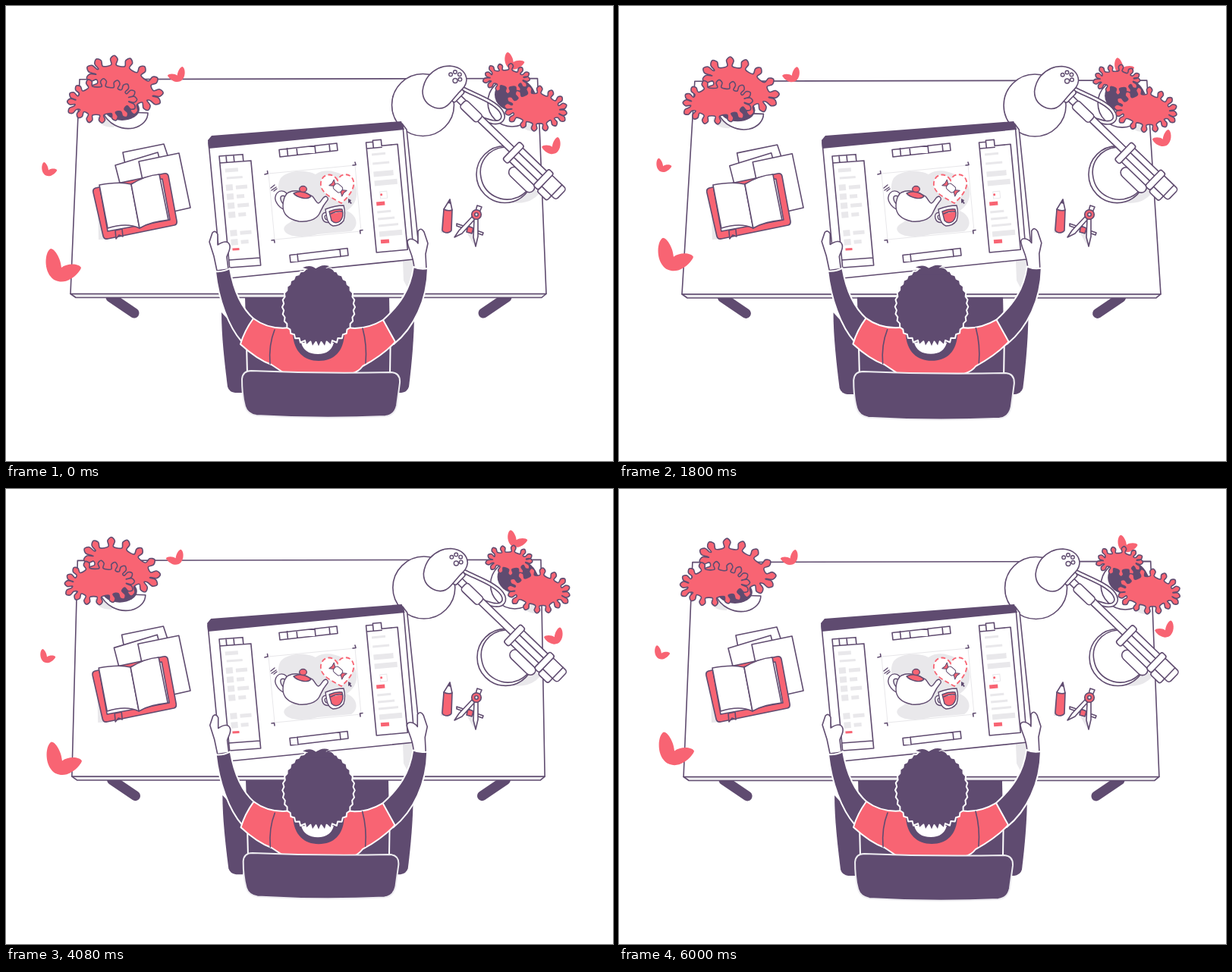
An HTML page for the animation above (6040 ms loop, 800 by 600 pixels).

```html
<!DOCTYPE html>
<html lang="en">
<head>
<meta charset="utf-8">
<title>Designer at a desk</title>
<style>
  html, body { margin: 0; width: 100%; height: 100%; overflow: hidden; background: #fff; }
  svg { display: block; width: 800px; height: 600px; }
  .l { fill: #fff; stroke: #604c70; stroke-width: 1.6; stroke-linejoin: round; stroke-linecap: round; }
  .n { fill: none; }
  .d { fill: #5f4b70; }
  .r { fill: #f86473; }
  .g { fill: #e9e8eb; }
  .w { stroke: #fff; stroke-width: 2; stroke-linejoin: round; }
  .thin { stroke-width: 1.4; }
</style>
</head>
<body>
<!-- data-m: drift x y, stretch x y, stretch centre x y -->
<svg viewBox="0 0 800 600">
  <defs>
    <path id="heart" class="r" d="M21 25C20 12 12 0 7 0C0 3 -3 25 7 37C12 44 24 46 33 40C41 36 47 27 47 25C44 19 28 19 21 25Z"/>
  </defs>

  <!-- desk -->
  <g fill="none" stroke="#5f4b70" stroke-width="13" stroke-linecap="round">
    <path data-m="-1.7 .4" d="M138 384L169 405"/>
    <path data-m="1.7 .4" d="M660 384L629 405"/>
  </g>
  <polygon id="edge" class="l" style="fill:#eeedf0"/>
  <polygon id="desk" class="l"/>

  <!-- floating hearts -->
  <g data-m="2.3 .3"><use href="#heart" transform="translate(236 80)scale(-.49 .46)"/></g>
  <g data-m="2.2 -5.5"><use href="#heart" transform="translate(47 206)scale(.43 .42)"/></g>
  <g data-m="-1.1 -15"><use href="#heart" transform="translate(52 320)"/></g>
  <g data-m="-4.4 7.6"><use href="#heart" transform="translate(657 61)scale(.56 .52)"/></g>
  <g data-m="-3.3 -10.6"><use href="#heart" transform="translate(731 173)scale(-.53 .51)"/></g>

  <!-- left plant -->
  <g data-m="3.6 1.4">
    <path class="g" d="M120 146Q122 160 142 160L150 150Z"/>
    <path class="l" d="M127 139C134 156 152 164 168 161C180 158 187 150 187 141Z"/>
    <ellipse class="d" cx="153" cy="136" rx="23" ry="15"/>
  </g>
  <g data-m="4.2 1.9"><path id="leafA" class="l r" transform="translate(155 104)rotate(25)"/></g>
  <g data-m="3.7 1.7"><path id="leafB" class="l r" transform="translate(127 125)rotate(-5)"/></g>

  <!-- right plant -->
  <g data-m="-4 1.2">
    <path class="g" d="M672 152Q688 170 699 163L692 146Z"/>
    <ellipse class="l" cx="667" cy="127" rx="32" ry="32"/>
    <ellipse class="d" cx="670" cy="117" rx="26" ry="22"/>
  </g>
  <g data-m="-3.9 1.6"><path id="leafC" class="l r" transform="translate(660 95)"/></g>
  <g data-m="-4.3 1.5"><path id="leafD" class="l r" transform="translate(699 136)rotate(4)"/></g>

  <!-- papers and book -->
  <g data-m="0 0 -.018 -.012 245 268" class="l">
    <path d="M154 193L208 182L213 197L218 220L160 225Z"/>
    <path d="M144 210L200 193L215 250L153 245Z"/>
    <path d="M175 205L228 194L243 266L190 278Z"/>
  </g>
  <g data-m=".9 0">
    <path class="g" d="M121 262L129 304Q131 308 140 307L122 308Z"/>
    <path class="l r" d="M118 240L208 221Q213 220 214 224L225 283Q226 288 222 289L134 307Q129 308 128 303L115 246Q114 241 118 240Z"/>
    <path class="l" d="M124 241L134 297L216 282L206 228Z"/>
    <path class="l" d="M123 236Q149 231 165 235L176 293Q159 285 134 293Z"/>
    <path class="l" d="M165 235C178 227 190 223 202 222L214 282C200 284 188 286 176 293Z"/>
    <path class="l r" d="M144 296L153 294L154 304L149 302L145 307Z"/>
  </g>

  <!-- pencil and compass -->
  <path class="g" d="M574 281L582 262L582 299L573 299Z"/>
  <path class="l r" d="M577 268L588 269L587 296Q585 299 580 299Q575 298 575 295Z"/>
  <path class="l" d="M577 268L585 255L588 269Q583 271 577 268Z"/>
  <path class="d" d="M582.5 260L585 254L586.5 261Z"/>
  <path class="g" d="M608 300L624 303L616 314Z"/>
  <g class="l">
    <path d="M621 263L627 265L624 272L619 270Z"/>
    <path d="M594 287L629 299L628 302L594 290Z"/>
    <path class="r" d="M609 290L616 293L614 300L607 298Z"/>
    <path d="M614 278L618 281L601 300L591 305L597 296Z"/>
    <path d="M617 281L622 281L622 304L619 317L616 305Z"/>
    <circle class="r" cx="620" cy="275" r="6.3"/>
    <circle cx="620" cy="275" r="2.2"/>
  </g>

  <!-- lamp -->
  <g data-m="-1.1 .1">
    <path class="g" d="M664 259Q690 263 703 247L688 234Z"/>
    <circle class="l" cx="657.5" cy="222" r="37.5"/>
    <path class="l n" d="M657 186C635 188 622 207 626 226C630 249 654 261 675 252C688 246 693 237 695 225"/>
  </g>
  <g data-m="-1.5 .5">
    <circle class="l" cx="549.5" cy="130.5" r="41"/>
    <path class="l n" style="stroke-width:6" d="M602 109C622 119 643 126 652 138C659 148 653 155 641 153L620 147"/>
    <path class="n" stroke="#fff" stroke-width="2.8" d="M602 109C622 119 643 126 652 138C659 148 653 155 641 153L620 147"/>
    <g class="l" transform="translate(595 118)rotate(44)">
      <rect x="117" y="14" width="42" height="14" rx="7"/>
      <rect x="3" y="-3" width="15" height="9"/>
      <rect x="-3" y="-10" width="7" height="20" rx="3"/>
      <rect x="40" y="-3" width="66" height="9"/>
      <rect x="12" y="-4" width="31" height="13" rx="4"/>
      <rect x="108" y="-10" width="49" height="25"/>
      <path d="M108 -2H157M108 7H157"/>
      <rect x="101" y="-13" width="9" height="32" rx="3"/>
      <rect x="163" y="8" width="18" height="10" rx="3"/>
      <rect x="161" y="-11" width="28" height="20" rx="4"/>
      <path d="M181 -11V9"/>
      <rect x="154" y="-14" width="9" height="30" rx="3"/>
    </g>
    <path class="l" d="M557 92C565 83 575 79 585 79C600 80 607 89 607 98C606 106 602 109 597 114L585 128C578 136 571 136 565 134C554 130 549 122 549 112C550 104 553 97 557 92Z"/>
    <g class="l thin" id="holes"><circle cx="592" cy="98.5" r="3"/></g>
  </g>

  <!-- monitor -->
  <path class="g" d="M273 320L283 379L291 379L287 350ZM524 362L533 379L538 335L523 336Z"/>
  <g data-m="0 0 -.007 0 410 0">
    <path class="l" d="M522 155L528 163L543 308L538 334L530 334Z"/>
    <path class="l" d="M267 180L523 158L538 334L284 360Z"/>
    <path class="d" d="M266 177L271 171L521 152L525 163L267 188Z"/>
  </g>
  <g transform="matrix(1 -.075 .093 1 281 198)">
    <path class="l" d="M0 0H31V9H41V147H0ZM0 9H31M9 0V9M19 0V9M0 137H41"/>
    <g class="g" id="listA"></g>
    <rect class="r" x="6" y="122" width="9" height="3"/>
  </g>
  <g transform="matrix(1 -.09 .095 1 474.5 180)">
    <path class="l" d="M0 0H9V-2H20V6H41V145H0ZM0 8H20M9 0V8"/>
    <g class="g" id="listB"></g>
    <path class="n" stroke="#e9e8eb" d="M12 66H21V75H12Z"/>
    <circle class="r" cx="13.5" cy="70" r="1.5"/>
    <rect class="r" x="6" y="79" width="11" height="5"/>
    <rect class="r" x="7" y="129" width="11" height="5"/>
  </g>
  <g class="l">
    <path d="M360 189.5L436 181L437 190.5L361 199ZM370.5 188L371.5 198M383 187L384 196.5M407 184L408 194M426 182L427 192"/>
    <path d="M374 328.5L450 319.5L451 329L375 338ZM384 327L385 337M440 321L441 330.5"/>
  </g>

  <!-- artwork on screen -->
  <path d="M346 221L460 210L468 297L354 308Z" fill="#fff" stroke="#e8e7ea"/>
  <path class="g" d="M362 227C372 215 398 216 408 222C424 211 447 221 460 236C466 251 459 264 449 270C464 276 465 291 455 297L411 301C397 305 375 306 368 298C361 289 377 286 381 280C365 269 353 242 362 227Z"/>
  <path class="l n" d="M341 222L345 221L344.5 217.5M457 210L461 209.5L460 206M467 300L466.5 296L470 295.5M350 309L353.5 308.5L354 312"/>
  <g class="l thin">
    <path d="M349 240L354 236M350 243L356 239M353 244L357 241"/>
    <path d="M370 247C361 238 350 250 357 260C359 264 363 267 368 269L370 264C360 259 359 247 368 251Z"/>
    <path d="M372 246C382 241 394 245 404 251C409 257 409 260 412 260C417 257 417 251 422 251Q426 254 423 257C417 264 416 268 413 274C409 282 397 285 386 284C371 281 365 273 365 264C365 256 367 250 372 246Z"/>
    <path class="r" d="M379 247Q386 244 390 245Q397 246 402 251Q398 255 390 253Q382 251 379 247Z"/>
    <ellipse class="r" cx="391.5" cy="241.5" rx="4.8" ry="4"/>
    <path d="M422 272Q415 273 417 280Q419 287 427 285L425 282Q420 283 420 277L423 275Z"/>
    <path d="M421 268Q434 263 445 263Q448 274 445 283Q440 290 431 290Q425 288 423 280Z"/>
    <path class="r" d="M426 271Q435 267 443 268Q446 278 440 284Q434 288 429 283Z"/>
    <path d="M428 274Q436 270 443 271"/>
  </g>
  <path fill="#fff" stroke="#f86473" stroke-width="1.8" stroke-dasharray="6 3.5" d="M437 230C430 217 413 222 415 237C417 248 430 253 442 260C451 252 460 241 458 231C455 219 440 220 437 230Z"/>
  <g class="l" style="stroke-width:1" transform="translate(437.5 240)rotate(40)">
    <path class="r" d="M-4 0L-11 -5L-10 0L-11 5ZM4 0L11 -5L10 0L11 5Z"/>
    <rect x="-6" y="-4.5" width="12" height="9" rx="3.5"/>
  </g>
  <path class="d" d="M451 254L455 256L454 258L456 260L454 261L453 259L451 260Z"/>

  <!-- chair seat and arms -->
  <g data-m="0 0 .012 .016 411 385">
    <path class="d" d="M315 384H505L507 486H318Z"/>
    <path class="d" d="M284 404L317 440L318 486L311 510H302Q294 509 292 502C288 470 284 435 284 404Z"/>
    <path class="d" d="M538 404L507 440L506 486L512 510H521Q529 509 531 502C535 470 538 435 538 404Z"/>
    <path class="n w" d="M316.5 425L318 486M507 425L506 486"/>
  </g>

  <!-- person -->
  <g data-m="0 -.4 .006 .002 411 390">
    <path class="l" d="M278 349L274 330L268 311L272 299Q276 295 279 301V315C285 311 293 308 295 316C296 322 292 326 291 331L293 347Z"/>
    <path class="l" d="M538 346C537 328 530 321 529 311C530 304 540 308 543 313V297Q547 291 551 298L556 313L553 327L554 347Z"/>
    <path class="d w" d="M276 350Q286 351 295 346C300 375 311 399 327 413L311 443C293 423 280 386 276 350Z"/>
    <path class="d w" d="M537 344Q546 348 556 346C555 388 538 424 511 446L496 415C519 394 533 374 537 344Z"/>
    <path class="r w" d="M326 412C342 424 361 428 386 422H440C460 428 480 424 497 414L513 443C498 459 481 469 470 475Q465 482 455 485H368L350 473C336 468 322 458 309 446C313 432 318 423 326 412Z"/>
    <path class="l n" d="M354 427Q346 447 348 472M470 425Q476 447 474 471"/>
    <path class="d" d="M378 432C379 456 393 468 412 468C432 468 445 456 446 432Z"/>
    <path d="M389 444Q393 459 411 459Q428 459 432 444Z" fill="#fff"/>
    <path id="hair" class="d w"/>
    <path class="d" d="M388 354L398 347L391 345Q402 340 409 347Q415 340 426 343L421 346Q431 344 434 354Z"/>
  </g>
  <path data-m="0 0 .018 .03 415 445" class="d" stroke="#eeedf1" stroke-width="2" d="M323 481Q415 485 508 483Q520 484 519 497L515 527Q512 540 500 541Q415 545 330 540Q318 538 315 528C311 514 311 503 311 492Q312 481 323 481Z"/>
</svg>

<script>
const LOOP = 6040, STEP = 40, TURN = 2 * Math.PI;
const { sin, cos, hypot } = Math;
const $ = id => document.getElementById(id);
const range = (n, f) => Array.from({ length: n }, (_, i) => f(i));
const rect = (x, y, w, h) => `<rect x="${x}" y="${y}" width="${w}" height="${h}"/>`;
const noise = n => { const v = sin(n * 127.1) * 43758.5; return v - Math.floor(v); };

// Closed curve through all points
function smooth(p) {
  const n = p.length, at = i => p[(i + n) % n];
  return 'M' + p[0] + p.map((b, i) => {
    const a = at(i - 1), c = at(i + 1), e = at(i + 2);
    const out = b.map((v, k) => v + (c[k] - a[k]) / 6);
    const into = c.map((v, k) => v - (e[k] - b[k]) / 6);
    return `C${out} ${into} ${c}`;
  }).join('') + 'Z';
}

// Ellipse with round-headed fingers along its normals
function foliage(id, rx, ry, count, r, seed) {
  const points = range(count, i => {
    const a = TURN * (i + .3 * noise(seed + i)) / count;
    const size = hypot(ry * cos(a), rx * sin(a));
    const nx = ry * cos(a) / size, ny = rx * sin(a) / size;
    const trim = r * noise(seed + i * 3);
    const at = (back, side) => [rx * cos(a) - back * nx - side * ny, ry * sin(a) - back * ny + side * nx];
    const neck = trim + 2.6 * r;
    return [at(neck, -.7 * r), at(trim + r, -r), at(trim, 0), at(trim + r, r), at(neck, .7 * r)];
  }).flat();
  $(id).setAttribute('d', smooth(points));
}
foliage('leafA', 55, 37, 14, 4.8, 1);
foliage('leafB', 49, 32, 16, 4, 2);
foliage('leafC', 33, 22, 13, 3.2, 3);
foliage('leafD', 44, 31, 16, 3.7, 4);

// Oval hair whose jagged edge grows into a fringe at the nape
$('hair').setAttribute('d', 'M' + range(72, i => {
  const a = TURN * i / 72, cut = i % 2 * (2 + 6 * Math.max(0, sin(a)) ** 6);
  return [412 + (48 - cut) * cos(a), 397 + (54 - cut) * sin(a)];
}).join('L') + 'Z');

$('listA').innerHTML = rect(6, 17, 17, 5) + rect(7, 28, 21, 3) + range(6, i => {
  const y = 38 + 12 * (i + (i > 3));
  return rect(5, y, 9, 8) + rect(18, y + 2, i % 2 ? 10 : 15, 5);
}).join('');
$('listB').innerHTML = range(4, i => {
  const w = 18 + 4 * i, h = i > 1 ? 7 : 3;
  return rect(6, 15 + 12 * i, w, h) + rect(6, 91 + 9 * i, w, i > 2 ? 7 : 3);
}).join('');
$('holes').innerHTML += range(4, i =>
  `<circle cx="${592 + 7 * cos(3.7 + i)}" cy="${94 + 7 * sin(3.7 + i)}" r="2.3"/>`).join('');

const movers = [...document.querySelectorAll('[data-m]')]
  .map(el => [el, el.dataset.m.split(' ').map(Number)]);

function draw(now) {
  const t = Math.floor(now % LOOP / STEP) * STEP;
  const s = sin(TURN * t / LOOP);
  for (const [el, [dx, dy, kx = 0, ky = 0, cx = 0, cy = 0]] of movers)
    el.setAttribute('transform',
      `matrix(${1 + kx * s} 0 0 ${1 + ky * s} ${(dx - kx * cx) * s} ${(dy - ky * cy) * s})`);

  // The desk tilts: its far side narrows while its near side widens
  const far = 96 + 2.6 * s, near = 379.5 + .5 * s;
  const left = 85 - 2.1 * s, right = 712 + 2.1 * s;
  $('desk').setAttribute('points', [97 + 3 * s, far + .7, 700.5 - 5 * s, far - .5, right, near, left, near]);
  $('edge').setAttribute('points', [left, near, right, near, right - 6, near + 5, left + 7, near + 5]);
}

const start = performance.now();
function tick() {
  draw(performance.now() - start);
  requestAnimationFrame(tick);
}
tick();
</script>
</body>
</html>
```
